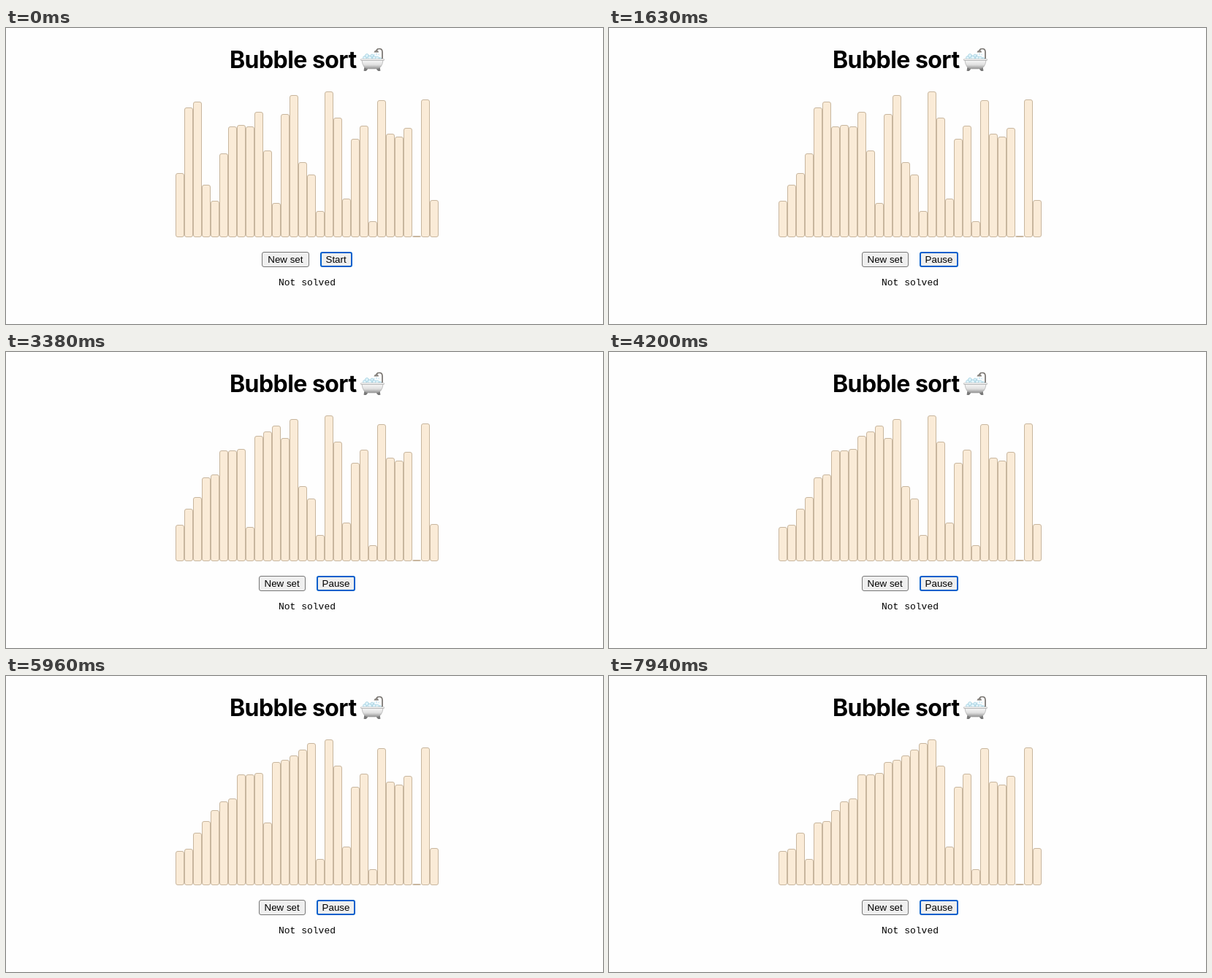
Write an HTML page that moves like this. It is 817 px wide and 406 px high and loops after 8000 ms.

```html
<!DOCTYPE html>
<html lang="en">
<head>
<meta charset="utf-8">
<title>Bubble sort</title>
<style>
  html, body { margin: 0; width: 100%; height: 100%; overflow: hidden; background: #fefefe; }
  svg { display: block; }
  .title { font: 700 32px Inter, sans-serif; font-optical-sizing: none; letter-spacing: -.55px; }
  .label { font: 13.333px "Liberation Sans", Arial, sans-serif; text-anchor: middle; }
  .status { font: 13px "Liberation Mono", "Courier New", monospace; text-anchor: middle; }
  .bar { fill: #faebd7; stroke: #c8b69e; }
  .button { fill: #efefef; stroke: #767676; }
  .focused { stroke: #005fcc; stroke-width: 2; }
</style>
</head>
<body>
<svg width="817" height="406" viewBox="0 0 817 406">
  <defs>
    <linearGradient id="enamel" x2="0" y2="1">
      <stop offset="0" stop-color="#fafafa"/>
      <stop offset=".55" stop-color="#dedede"/>
      <stop offset="1" stop-color="#929292"/>
    </linearGradient>
  </defs>

  <text class="title" x="306" y="55">Bubble sort</text>

  <g id="bathtub" stroke-linecap="round" stroke-linejoin="round">
    <path d="M515 43V33Q515 28.500 511 28.500Q507.500 28.500 507 31" fill="none" stroke="#77736f" stroke-width="1.700"/>
    <path d="M503.500 33.500Q504 30.500 507 30.500T510 33.500Z" fill="#898580"/>
    <path d="M504 36v1M507 35v2M510 36v1" stroke="#9bd5ec" stroke-width=".8"/>
    <g fill="#dff3fa" stroke="#9acbdc" stroke-width=".7">
      <circle cx="491" cy="41" r="2.500"/><circle cx="494" cy="38" r="2.500"/>
      <circle cx="498" cy="41" r="3"/><circle cx="501" cy="38" r="2"/>
      <circle cx="504" cy="41" r="2.500"/><circle cx="508" cy="41.500" r="2.500"/>
      <circle cx="512" cy="42" r="1.500"/>
    </g>
    <path d="M491 54l-1 4.500h3l2-3M511 54l1 4.500h-3l-2-3" fill="#777" stroke="#777"/>
    <path d="M487 44H516Q515 56 506 56H496Q488 56 487 44Z" fill="url(#enamel)" stroke="#a2a2a2" stroke-width=".6"/>
    <path d="M486.500 43.500H516.500" stroke="#aaa" stroke-width="2.600"/>
    <path d="M486.500 43.200H516.500" stroke="#f4f4f4" stroke-width="1.400"/>
  </g>

  <g id="bars"></g>

  <rect id="newButton" class="button" y="307.500" height="20" rx="2.500"/>
  <text id="newLabel" class="label" y="322">New set</text>
  <rect id="runButton" class="button focused" y="308" height="19" rx="2"/>
  <text id="runLabel" class="label" y="322"></text>

  <text class="status" x="412" y="353">Not solved</text>
</svg>

<script>
const LOOP = 8000;
const BASELINE = 287, BAR_LEFT = 232, BAR_WIDTH = 12;
const heights = [88, 178, 186, 72, 50, 115, 152, 154, 152, 172, 119, 47, 169, 195, 103,
                 86, 36, 200, 164, 53, 135, 153, 22, 188, 142, 138, 150, 2, 189, 51];

// Swaps run on a steady clock; the screen repaints a little more slowly.
const SORT_START = 703, SWAP_INTERVAL = 98.5;
const repaintRuns = [[830, 1630, 8], [1750, 2450, 7], [2560, 3260, 7], [3380, 4080, 7], [4200, 4910, 7],
                     [5020, 5730, 7], [5850, 6550, 7], [6670, 7360, 7], [7480, 7940, 5]];
const repaints = repaintRuns.flatMap(([first, last, count]) =>
  Array.from({ length: count }, (_, i) =>
    Math.floor((first + (last - first) * i / (count - 1)) / 10 + 1e-6) * 10));

const byId = id => document.getElementById(id);

function setAttributes(element, attributes) {
  for (const [name, value] of Object.entries(attributes)) element.setAttribute(name, value);
}

const bars = heights.map((_, i) => {
  const bar = document.createElementNS("http://www.w3.org/2000/svg", "rect");
  setAttributes(bar, { class: "bar", x: BAR_LEFT + BAR_WIDTH * i + .5, width: BAR_WIDTH - 1, rx: 2.5 });
  return byId("bars").appendChild(bar);
});

// Every arrangement of the bars, indexed by the number of swaps made.
function sortStates(values) {
  const current = [...values], states = [[...values]];
  for (let i = 1; i < current.length; i++) {
    for (let j = i; j > 0 && current[j - 1] > current[j]; j--) {
      [current[j - 1], current[j]] = [current[j], current[j - 1]];
      states.push([...current]);
    }
  }
  return states;
}
const states = sortStates(heights);

function drawButtons(running) {
  setAttributes(byId("newButton"), { x: running ? 346.5 : 350.5, width: running ? 63 : 64 });
  setAttributes(byId("newLabel"), { x: running ? 377.6 : 382.4 });
  setAttributes(byId("runButton"), { x: running ? 426 : 431, width: running ? 51 : 42 });
  setAttributes(byId("runLabel"), { x: running ? 451.5 : 451.6 });
  byId("runLabel").textContent = running ? "Pause" : "Start";
}

function draw(time) {
  const painted = repaints.filter(t => t <= time).pop();
  const running = painted !== undefined;
  const swaps = running ? Math.floor((painted - SORT_START) / SWAP_INTERVAL) : 0;
  states[swaps].forEach((height, i) =>
    setAttributes(bars[i], { y: BASELINE - height + .5, height: height - 1 }));
  drawButtons(running);
}

const start = performance.now();
function tick() {
  draw((performance.now() - start) % LOOP);
  requestAnimationFrame(tick);
}
tick();
</script>
</body>
</html>
```
